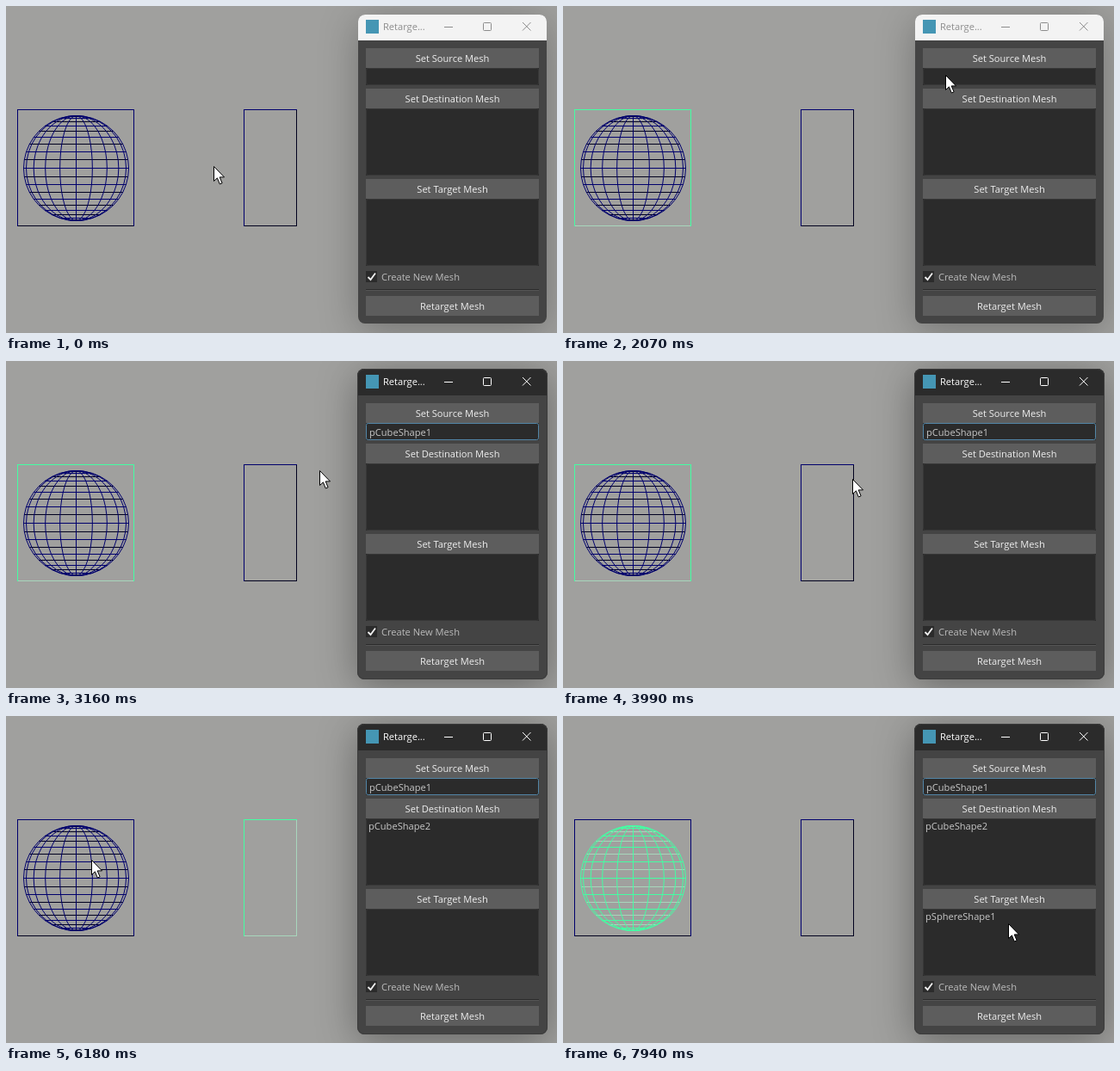
Animation of 640 by 380 pixels, one loop 8000 ms. Source, as an HTML page with a canvas:

```html
<!DOCTYPE html>
<html lang="en">
<head>
<meta charset="utf-8">
<title>Retarget Mesh</title>
<style>
html, body { margin: 0; width: 100%; height: 100%; overflow: hidden; background: #a0a09e; }
canvas { display: block; width: 640px; height: 380px; }
</style>
</head>
<body>
<canvas id="stage" width="640" height="380"></canvas>
<script>
const ctx = document.getElementById('stage').getContext('2d');
const LOOP = 8000;
const FONT = '"Open Sans", sans-serif';
const NAVY = ['#00006c', '#00001e'];
const GREEN = ['#43ffa3', '#a8d6bc'];

const easeOut = u => 1 - (1 - u) ** 2;
const smooth = u => u * u * (3 - 2 * u);
const linear = u => u;

// Cursor moves: start, end, number of steps, target x, target y, easing.
const HOME = [241, 186];
const MOVES = [
  [550, 1250, 11, 149, 144, smooth],
  [1580, 2280, 11, 510, 66, smooth],
  [2680, 3300, 9, 356, 130, easeOut],
  [3370, 3990, 9, 336, 137, easeOut],
  [4190, 4890, 11, 517, 104, smooth],
  [5350, 5770, 7, 138, 163, linear],
  [5840, 5980, 3, 99, 167, easeOut],
  [6310, 6920, 9, 488, 191, smooth],
  [6990, 7410, 7, 517, 213, easeOut],
  [7870, 7940, 2, 517, 241, linear]
];

const BUTTONS = [
  { label: 'Set Source Mesh', y: 49, h: 23, press: [2550, 2680] },
  { label: 'Set Destination Mesh', y: 96, h: 23, press: [5220, 5350] },
  { label: 'Set Target Mesh', y: 201, h: 23, press: [7610, 7740] },
  { label: 'Retarget Mesh', y: 337, h: 23, press: [0, 0] }
];

const within = (t, a, b) => t >= a && t < b;

function cursorAt(t) {
  let [x, y] = HOME;
  for (const [start, end, steps, tx, ty, ease] of MOVES) {
    if (t < start) break;
    const step = Math.floor((t - start) / (end - start) * (steps - 1) + 1e-6) + 1;
    const u = ease(Math.min(1, step / steps));
    x += (tx - x) * u;
    y += (ty - y) * u;
  }
  return [Math.round(x), Math.round(y)];
}

function rect(x, y, w, h, color) {
  ctx.fillStyle = color;
  ctx.fillRect(x, y, w, h);
}

function frame(x, y, w, h, color, r = 0) {
  ctx.strokeStyle = color;
  ctx.lineWidth = 1;
  ctx.beginPath();
  ctx.roundRect(x + 0.5, y + 0.5, w - 1, h - 1, r);
  ctx.stroke();
}

function text(str, x, y, color, align = 'left') {
  ctx.font = '11.1px ' + FONT;
  ctx.textAlign = align;
  ctx.fillStyle = color;
  ctx.fillText(str, x, y);
}

function line(color, width, ...pts) {
  ctx.strokeStyle = color;
  ctx.lineWidth = width;
  ctx.beginPath();
  pts.forEach(([x, y]) => ctx.lineTo(x, y));
  ctx.stroke();
}

function drawCube(x, w, [main, dim]) {
  rect(x, 255, w, 1, dim);
  rect(x + w - 1, 120, 1, 136, w < 100 ? dim : main);
  rect(x, 120, w, 1, main);
  rect(x, 120, 1, 136, main);
}

function drawSphere([main, dim]) {
  const cx = 81.5, cy = 188.5, r = 61, seg = Math.PI / 20;
  for (let k = -9; k <= 9; k++) {
    const half = Math.round(r * Math.cos(k * seg));
    const y = Math.round(cy - 0.5 + r * Math.sin(k * seg));
    rect(cx - 0.5 - half, y, half * 2 + 1, 1, k % 2 ? dim : main);
  }
  for (let m = -5; m <= 5; m++) {
    const pts = [];
    for (let k = -10; k <= 10; k++) {
      pts.push([cx + r * Math.sin(m * 2 * seg) * Math.cos(k * seg), cy + r * Math.sin(k * seg)]);
    }
    line(main, 1, ...pts);
  }
}

function drawWindow(active) {
  const grow = active ? 1 : 0;
  const x = 409 - grow, y = 10 - grow, w = 219 + 2 * grow, h = 359 + 2 * grow;
  ctx.save();
  ctx.shadowColor = active ? 'rgba(0,0,0,.36)' : 'rgba(0,0,0,.28)';
  ctx.shadowBlur = 46;
  ctx.shadowOffsetY = 8;
  ctx.fillStyle = '#444444';
  ctx.beginPath();
  ctx.roundRect(x, y, w, h, 8);
  ctx.fill();
  ctx.restore();

  ctx.save();
  ctx.beginPath();
  ctx.roundRect(x, y, w, h, 8);
  ctx.clip();
  rect(x, y, w, 40 - y, active ? '#2b2b2b' : '#f3f3f3');
  ctx.restore();
  if (active) frame(x, y, w, h, '#3b3b3b', 8);

  const ink = active ? '#ffffff' : '#8c8c8c';
  rect(418, 16, 15, 16, '#4596b4');
  text('Retarge...', 438, 28, ink);
  line(ink, 1, [509, 24.5], [519, 24.5]);
  frame(554, 19, 10, 10, ink, 1);
  line(ink, 1, [600, 19], [609.5, 28.5]);
  line(ink, 1, [609.5, 19], [600, 28.5]);
}

function drawButton({ label, y, h, press }, t, [mx, my]) {
  const hover = within(mx, 418, 619) && within(my, y, y + h);
  const pressed = within(t, ...press);
  rect(418, y, 201, h, pressed ? '#1d1d1d' : hover ? '#707070' : '#5d5d5d');
  text(label, 518.5, y + 16, '#eeeeee', 'center');
}

function drawBox(y, h, value, border) {
  rect(418, y, 201, h, '#2b2b2b');
  frame(418, y, 201, h, border || '#383838', 2);
  if (value) text(value, border ? 422 : 421, y + (h < 30 ? 15 : 13), '#c8c8c8');
}

function drawPanel(t, active, cursor) {
  drawBox(72, 20, t >= 2680 && 'pCubeShape1', active && '#5285a6');
  drawBox(119, 78, t >= 5350 && 'pCubeShape2');
  drawBox(224, 78, t >= 7740 && 'pSphereShape1');
  BUTTONS.forEach(b => drawButton(b, t, cursor));

  rect(418, 308, 13, 13, '#2b2b2b');
  line('#f0f0f0', 1.8, [420.5, 315], [423.5, 318], [429, 310.5]);
  text('Create New Mesh', 436, 319, '#bbbbbb');
  rect(418, 329, 201, 1, '#2b2b2b');
  rect(418, 330, 201, 1, '#555555');
}

function drawCursor([x, y]) {
  ctx.save();
  ctx.translate(x + 0.5, y + 0.5);
  ctx.beginPath();
  [[0, 0], [0, 17], [3.9, 13.4], [6.8, 20.5], [9.6, 19.3], [6.7, 12.4], [12, 12.4]]
    .forEach(([px, py]) => ctx.lineTo(px, py));
  ctx.closePath();
  ctx.fillStyle = '#ffffff';
  ctx.fill();
  ctx.strokeStyle = '#000000';
  ctx.lineWidth = 1;
  ctx.stroke();
  ctx.restore();
}

function draw(t) {
  const active = within(t, 2550, 4190) || within(t, 5220, 6310) || t >= 7610;
  const cursor = cursorAt(t);
  rect(0, 0, 640, 380, '#a0a09e');
  drawSphere(t >= 6310 ? GREEN : NAVY);
  drawCube(13, 136, within(t, 1580, 4190) ? GREEN : NAVY);
  drawCube(276, 62, within(t, 4190, 6310) ? GREEN : NAVY);
  drawWindow(active);
  drawPanel(t, active, cursor);
  drawCursor(cursor);
}

const begin = performance.now();
function tick() {
  draw((performance.now() - begin) % LOOP);
  requestAnimationFrame(tick);
}
tick();
</script>
</body>
</html>
```
